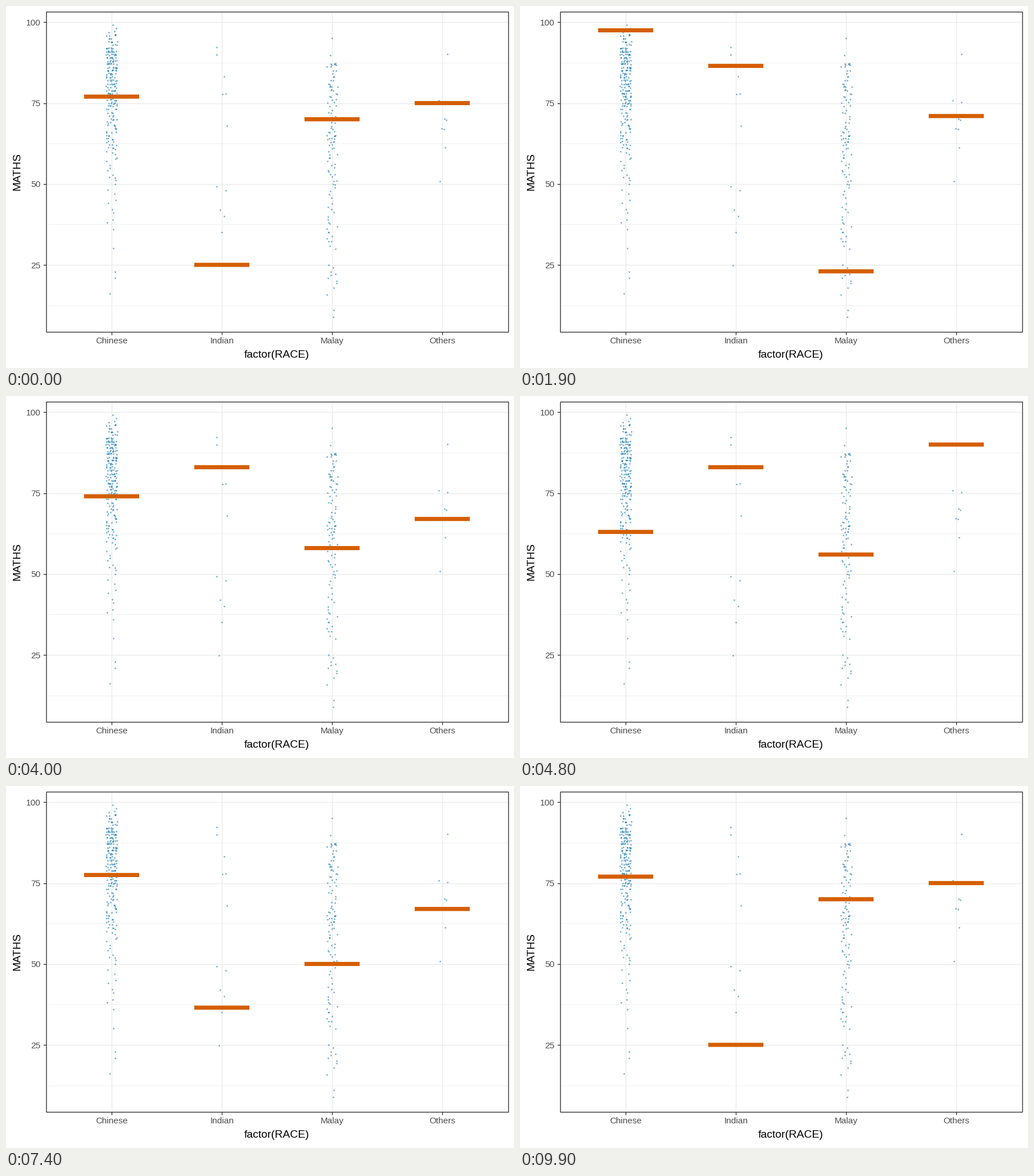
Write a matplotlib script that moves like this. It is 885 px wide and 632 px high and loops after 10000 ms.

```python
import numpy as np
import matplotlib.pyplot as plt
from matplotlib.animation import FuncAnimation
from matplotlib.patches import Rectangle

W, H, DPI = 885, 632, 100
LEFT, TOP, RIGHT, BOTTOM = 69.5, 9.5, 875, 568.5
GROUPS = ["Chinese", "Indian", "Malay", "Others"]
CENTERS = 184 + 192 * np.arange(4)
BAR_W, BAR_H = 96, 7.2
FRAMES, INTERVAL = 100, 100

plt.rcParams["font.family"] = "Liberation Sans"

# One sampled score per group in every state.
STATES = np.array([
    (77, 25, 70, 75), (85, 42, 64, 70), (94, 25, 79, 67), (97, 78, 58, 70),
    (98, 90, 11, 75), (97, 83, 35, 67), (79, 49, 65, 67), (91, 40, 21, 75),
    (71, 48, 75, 70), (74, 25, 63, 70), (74, 83, 58, 67), (80, 68, 19, 75),
    (63, 83, 56, 90), (79, 42, 66, 70), (86, 25, 64, 75), (95, 78, 50, 51),
    (74, 35, 85, 51), (97, 68, 52, 70), (78, 48, 37, 67), (77, 25, 63, 67),
    (83, 78, 45, 67), (78, 68, 71, 70), (73, 78, 58, 51), (81, 25, 66, 51),
    (91, 42, 54, 70)])

# Small groups: offset from the group's center in pixels, score.
INDIAN = [(-9, 92.2), (-9.5, 90), (4, 83.2), (0.5, 77.8), (6.5, 77.9),
          (8.5, 68), (-9.5, 49.3), (7, 48), (-3, 42), (3.5, 40.1),
          (0, 35.1), (-5, 24.8)]
OTHERS = [(9, 90.2), (-6.5, 75.8), (9, 75.2), (3.5, 70.1), (6.5, 69.8),
          (-1.5, 67.2), (2.5, 67), (4.5, 61.2), (-4.5, 50.8)]

# Large groups: rank -> score curves, filled in by interpolation.
CHINESE = [(0, 99), (2, 97), (22, 92), (41, 90), (82, 85), (129, 78),
           (157, 74), (205, 60), (217, 50), (226, 36), (227, 30),
           (228, 23), (229, 21), (230, 16)]
MALAY = [(0, 95), (1, 90), (2, 87), (7, 87), (17, 81), (24, 79), (33, 75),
         (46, 66), (59, 63), (82, 49), (90, 40), (103, 30), (104, 25),
         (111, 19), (113, 16), (114, 11), (115, 9)]

rng = np.random.default_rng(7)


def to_y(score):
    return 28.3 + (100 - score) * 5.648


def crowd(curve):
    ranks, scores = np.array(curve).T
    score = np.round(np.interp(np.arange(ranks[-1] + 1), ranks, scores))
    jitter = rng.uniform(-1, 1, (2, score.size))
    return np.column_stack([9.6 * jitter[0], score + 0.25 * jitter[1]])


def px(width):
    return width * 72 / DPI


fig = plt.figure(figsize=(W / DPI, H / DPI), dpi=DPI, facecolor="white")
ax = fig.add_axes([0, 0, 1, 1])
ax.set(xlim=(0, W), ylim=(H, 0))
ax.axis("off")


def line(xs, ys, color, width):
    ax.plot(xs, ys, color=color, lw=px(width), zorder=1,
            solid_capstyle="butt")


def label(x, y, text, size, color, **kw):
    ax.text(x, y, text, fontsize=px(size), color=color, va="baseline", **kw)


for score in np.arange(12.5, 100, 25):
    line([LEFT, RIGHT], [to_y(score)] * 2, "#EBEBEB", 0.7)
for score in range(25, 101, 25):
    y = to_y(score)
    line([LEFT, RIGHT], [y, y], "#EBEBEB", 1.39)
    line([LEFT - 5, LEFT], [y, y], "#333333", 1.39)
    label(60.5, y + 5.7, str(score), 15.3, "#4D4D4D", ha="right")
for center, name in zip(CENTERS, GROUPS):
    line([center, center], [TOP, BOTTOM], "#EBEBEB", 1.39)
    line([center, center], [BOTTOM, BOTTOM + 5], "#333333", 1.39)
    label(center, 589.3, name, 15.3, "#4D4D4D", ha="center")
label(472, 614, "factor(RACE)", 19.1, "black", ha="center")
label(24.8, 289, "MATHS", 19.1, "black", ha="center", rotation=90,
      rotation_mode="anchor")

dots = [crowd(CHINESE), np.array(INDIAN), crowd(MALAY), np.array(OTHERS)]
for center, group in zip(CENTERS, dots):
    ax.scatter(center + group[:, 0], to_y(group[:, 1]), s=3.6,
               color="#0072B2", alpha=0.6, lw=0, zorder=2)
bars = [ax.add_patch(Rectangle((c - BAR_W / 2, 0), BAR_W, BAR_H, lw=0,
                               color="#D55E00", snap=False, zorder=3))
        for c in CENTERS]
ax.add_patch(Rectangle((LEFT, TOP), RIGHT - LEFT, BOTTOM - TOP, fill=False,
                       ec="#333333", lw=px(1.39), zorder=4))

# Each state holds, then one in-between frame leads to the next.
order = np.arange(len(STATES) + 1)
starts = 4 * order - (order > 12)
ends = np.append(starts[1:] - 2, FRAMES)
knots = np.column_stack([starts, ends]).ravel()
levels = np.repeat(np.vstack([STATES, STATES[:1]]), 2, axis=0)


def update(frame):
    for bar, scores in zip(bars, levels.T):
        bar.set_y(to_y(np.interp(frame, knots, scores)) - BAR_H / 2)
    return bars


anim = FuncAnimation(fig, update, frames=FRAMES, interval=INTERVAL,
                     repeat=True, repeat_delay=0, blit=False)
plt.show()
```
